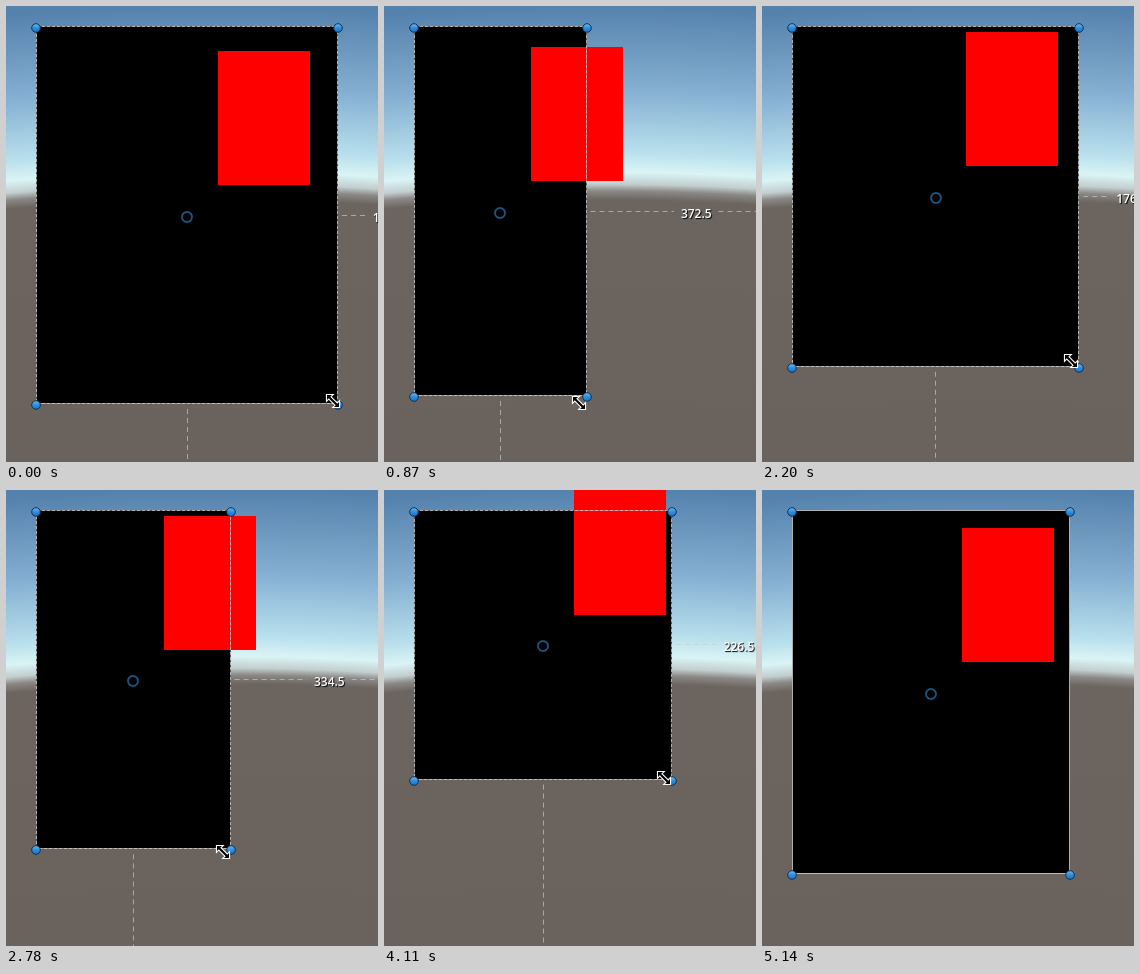
These frames come from a looping animation (372 by 456 pixels, 5770 ms). An HTML page with a canvas:

```html
<!DOCTYPE html>
<html lang="en">
<head>
<meta charset="utf-8">
<title>Resizing a rectangle</title>
<style>
  html, body { margin: 0; width: 100%; height: 100%; overflow: hidden; background: #6a625e; }
  canvas { display: block; }
</style>
</head>
<body>
<canvas id="stage" width="372" height="456"></canvas>
<script>
const W = 372, H = 456, LOOP = 5770;
const LEFT = 30, TOP = 22, PARENT_RIGHT = 422;
const LAST = 35, STEP = 147.2, LEAD_IN = 21;
const BULGE = 0.3, LEAD = 0.2;
const ctx = document.getElementById('stage').getContext('2d');

// Turning points of the dragged corner
const turns = [
  { step: 0, x: 332, y: 399 },
  { step: 6, x: 202.5, y: 391 },
  { step: 11, x: 346, y: 413 },
  { step: 19, x: 224.6, y: 360.4 },
  { step: 24, x: 312.4, y: 341 },
  { step: 28, x: 288, y: 290.6 },
  { step: LAST, x: 308, y: 385 }
];

const backdrop = curvedSky(2200, 215, {
  0: '#5582ad', 85: '#85b0d2', 145: '#b8dfec', 166: '#daf4f5',
  178: '#c2cecf', 185: '#8b8885', 194: '#6b645f', 456: '#6a625d'
});

// Bands follow a very large circle, so the horizon sinks towards both sides
function curvedSky(radius, apexX, colors) {
  const centre = H + radius;
  const g = ctx.createRadialGradient(apexX, centre, radius, apexX, centre, centre);
  for (const y in colors) g.addColorStop(1 - y / H, colors[y]);
  return g;
}

// Each stroke is an anticlockwise arc that speeds up towards its end
function cornerAt(step) {
  const s = Math.min(LAST, Math.max(0, step));
  const i = Math.max(1, turns.findIndex(t => t.step >= s));
  const a = turns[i - 1], b = turns[i];
  const k = ((s - a.step) / (b.step - a.step)) ** 1.5;
  const side = BULGE * Math.sin(Math.PI * k);
  const dx = b.x - a.x, dy = b.y - a.y;
  return { x: a.x + dx * k - dy * side, y: a.y + dy * k + dx * side };
}

function box(color, x, y, w, h) {
  ctx.fillStyle = color;
  ctx.fillRect(x, y, w, h);
}

function line(x0, y0, x1, y1) {
  ctx.beginPath();
  ctx.moveTo(x0, y0);
  ctx.lineTo(x1, y1);
  ctx.stroke();
}

function disc(x, y, radius) {
  ctx.beginPath();
  ctx.arc(x, y, radius, 0, Math.PI * 2);
}

function drawGuides(cx, cy, r, b) {
  const value = Math.round((372.5 - (r - 202.5) * 1.71) * 2) / 2;
  const mid = (r + PARENT_RIGHT) / 2;
  const x = Math.floor(cx) + 0.5, y = Math.round(cy - 2) + 0.5;
  ctx.save();
  ctx.font = '600 12px "Open Sans", "Noto Sans", sans-serif';
  const gap = ctx.measureText(value).width / 2 + 7;
  ctx.lineWidth = 1;
  ctx.strokeStyle = 'rgba(205, 205, 200, 0.65)';
  ctx.setLineDash([5, 4]);
  line(r + 4, y, mid - gap, y);
  line(mid + gap, y, PARENT_RIGHT, y);
  line(x, b + 4, x, H);
  ctx.textAlign = 'center';
  ctx.fillStyle = '#fff';
  ctx.shadowColor = '#000';
  ctx.shadowOffsetX = ctx.shadowOffsetY = 1;
  ctx.shadowBlur = 1;
  ctx.fillText(value, mid, Math.round(cy + 5));
  ctx.restore();
}

function drawFrame(right, bottom, dashed) {
  ctx.lineWidth = 1;
  ctx.strokeStyle = 'rgba(205, 205, 205, 0.85)';
  ctx.setLineDash(dashed ? [4, 1] : []);
  ctx.strokeRect(LEFT + 0.5, TOP - 1.5, right - LEFT - 1, bottom - TOP);
  ctx.setLineDash([]);
}

function drawPivot(x, y) {
  disc(x, y, 5);
  ctx.lineWidth = 2.4;
  ctx.strokeStyle = '#0b2236';
  ctx.stroke();
  ctx.lineWidth = 1.4;
  ctx.strokeStyle = '#225a85';
  ctx.stroke();
}

function drawHandle(x, y) {
  const g = ctx.createLinearGradient(0, y - 4, 0, y + 4);
  g.addColorStop(0, '#63b8f5');
  g.addColorStop(0.5, '#2a8ee2');
  g.addColorStop(1, '#1b74c8');
  disc(x, y, 4.3);
  ctx.fillStyle = g;
  ctx.fill();
  ctx.lineWidth = 1;
  ctx.strokeStyle = '#12304c';
  ctx.stroke();
}

// Diagonal two-headed arrow, one half mirrored through its centre
function drawCursor(x, y) {
  const half = [[-6, -6], [-1, -6], [-2.75, -4.25], [4.25, 2.75], [6, 1]];
  ctx.beginPath();
  for (const sign of [1, -1])
    for (const [px, py] of half) ctx.lineTo(x + sign * px, y + sign * py);
  ctx.closePath();
  ctx.lineWidth = 2.2;
  ctx.strokeStyle = '#fff';
  ctx.stroke();
  ctx.fillStyle = '#000';
  ctx.fill();
}

function draw(step) {
  const { x: r, y: b } = cornerAt(step);
  const right = Math.round(r), bottom = Math.round(b);
  const cx = (LEFT + r) / 2, cy = (TOP + b) / 2;
  const dragging = step < LAST;

  box(backdrop, 0, 0, W, H);
  if (dragging) drawGuides(cx, cy, r, b);
  box('#000', LEFT, TOP - 2, right - LEFT, bottom - TOP);
  box('#f00', Math.round(cx + 30.5), Math.round(cy - 165.4), 92, 134);
  drawFrame(right, bottom, dragging);
  drawPivot(Math.round(cx), Math.round(cy));
  for (const x of [LEFT, right])
    for (const y of [TOP, bottom]) drawHandle(x, y);

  if (dragging) {
    const before = cornerAt(step - 1), after = cornerAt(step + 1);
    drawCursor(
      Math.round(r - 3 + (after.x - before.x) * LEAD),
      Math.round(b - 2 + (after.y - before.y) * LEAD)
    );
  }
}

const start = performance.now();

function tick() {
  const t = (performance.now() - start) % LOOP;
  draw(Math.min(LAST, Math.floor((t + LEAD_IN) / STEP)));
  requestAnimationFrame(tick);
}

tick();
</script>
</body>
</html>
```
